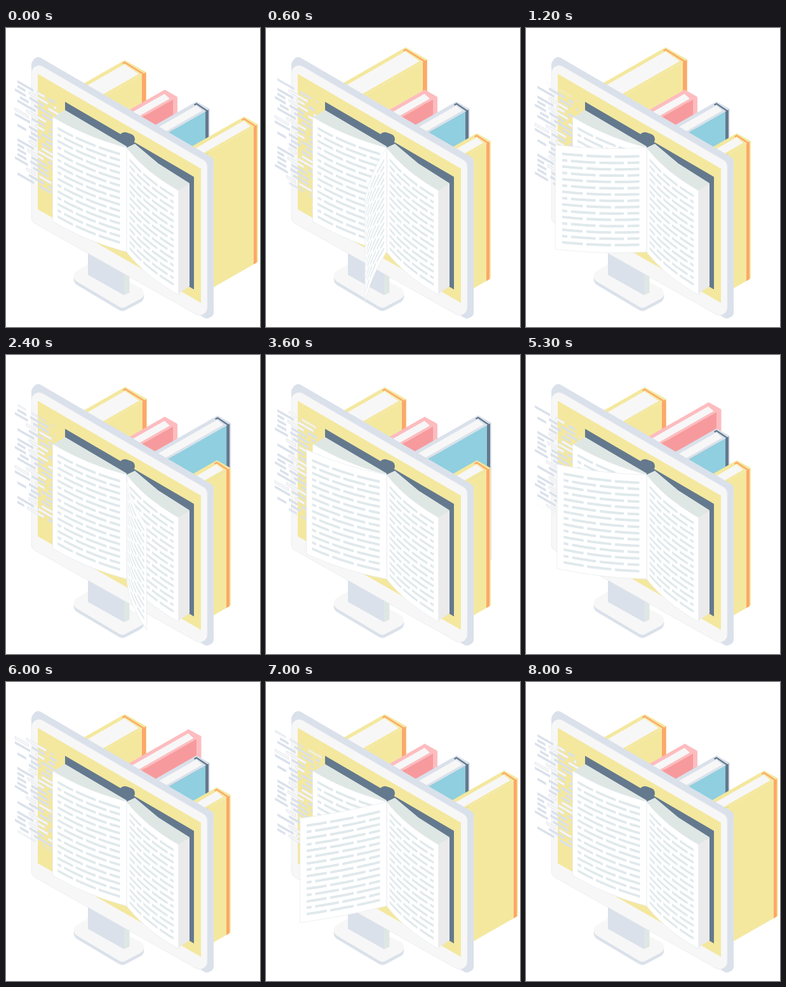
These frames come from a looping animation (400x470 px, 8100 ms). An HTML page with a canvas:

```html
<!DOCTYPE html>
<html lang="en">
<head>
<meta charset="utf-8">
<title>Online library</title>
<style>
html, body { margin: 0; width: 100%; height: 100%; overflow: hidden; background: #fff; }
canvas { display: block; width: 400px; height: 470px; }
</style>
</head>
<body>
<canvas id="stage"></canvas>
<script>
const LOOP = 8100, CYCLE = 8000, TURN = 2000, STEP = 100, SLIDE = 500;
const SLOPE = 0.57;
const C = {
  white: '#ffffff', paper: '#f7f7f7', edge: '#dae1eb', yellow: '#f4e89f', orange: '#fda769',
  pink: '#f79a9d', rose: '#fdbcbf', blue: '#8fcfdf', slate: '#64798d', text: '#e0e9ec',
  stack: '#dfe7e5', side: '#ebebeb', rim: '#e6e9ed'
};

const canvas = document.getElementById('stage');
const ctx = canvas.getContext('2d');
const scale = window.devicePixelRatio || 1;
canvas.width = 400 * scale;
canvas.height = 470 * scale;

// Cubic bezier easing with y1 = 0 and y2 = 1
function ease(x, x1, x2) {
  if (x <= 0) return 0;
  if (x >= 1) return 1;
  let lo = 0, hi = 1, s = 0.5;
  for (let i = 0; i < 30; i++) {
    s = (lo + hi) / 2;
    const bx = 3 * s * (1 - s) * (1 - s) * x1 + 3 * s * s * (1 - s) * x2 + s * s * s;
    if (bx < x) lo = s; else hi = s;
  }
  return s * s * (3 - 2 * s);
}

function seeded(seed) {
  return () => (seed = (seed * 16807) % 2147483647) / 2147483647;
}

function poly(points, fill, stroke) {
  ctx.beginPath();
  points.forEach(([x, y]) => ctx.lineTo(x, y));
  ctx.closePath();
  ctx.fillStyle = fill;
  ctx.fill();
  if (stroke) outline(stroke);
}

function outline(color, width = 0.7) {
  ctx.strokeStyle = color;
  ctx.lineWidth = width;
  ctx.stroke();
}

// Polygon with rounded corners
function rounded(points, radius, fill, stroke) {
  const n = points.length, [a, b] = [points[n - 1], points[0]];
  ctx.beginPath();
  ctx.moveTo((a[0] + b[0]) / 2, (a[1] + b[1]) / 2);
  points.forEach((p, i) => ctx.arcTo(...p, ...points[(i + 1) % n], radius));
  ctx.closePath();
  ctx.fillStyle = fill;
  ctx.fill();
  if (stroke) outline(stroke);
}

const shifted = (points, dx, dy) => points.map(([x, y]) => [x + dx, y + dy]);

// Books behind the screen, back to front; each slides out on its own turn
const books = [
  { x: 187, y: 50.5, w: 34, out: 33, turn: 0, lip: 0.5, face: C.yellow, rim: C.yellow, spine: C.orange },
  { x: 250, y: 97, w: 20, out: 37.5, turn: 2, lip: 2, face: C.pink, rim: C.rose, spine: C.rose },
  { x: 300, y: 115.5, w: 21, out: 34, turn: 1, lip: 2, face: C.blue, rim: C.edge, spine: C.slate },
  { x: 332, y: 165.5, w: 22, out: 43, turn: 3, lip: 2, face: C.yellow, rim: C.yellow, spine: C.orange }
];
const TALL = 216;

function slideAmount(turn, t) {
  const now = Math.floor(t / TURN) % 4;
  const k = ease((t % TURN) / SLIDE, 0.33, 0.2);
  if (turn === now) return k;
  return turn === (now + 3) % 4 ? 1 - k : 0;
}

function drawBook(b, t) {
  const move = b.out * slideAmount(b.turn, t);
  const back = ([x, y], len = 115) => [x - len, y + len * SLOPE];
  const drop = ([x, y]) => [x, y + TALL];
  const A = [0, 0], R = [b.w, b.w * 0.56], F = [b.w - 7, b.w * 0.56 + 4];
  const S = [R[0] - b.lip, R[1] + b.lip / 2];
  ctx.save();
  ctx.translate(b.x + move, b.y - move * 0.61);
  poly([A, R, F, back(F), back(A)], b.rim);
  poly([F, back(F), back(drop(F), 64), drop(F)], b.face);
  poly([F, R, drop(R), drop(F)], b.rim);
  poly([F, S, drop(S), drop(F)], b.spine);
  ctx.beginPath();
  ctx.moveTo(-3.5, 5.5);
  ctx.lineTo(0, 3.6);
  ctx.lineTo(F[0] + 3, F[1] - 0.8);
  outline(b.spine, 2.4);
  const P = [-0.5, 6.5], Q = [F[0] - 5, F[1] - 1.2];
  poly([P, Q, back(Q), back(P)], C.paper);
  ctx.restore();
}

function drawStand() {
  const base = [[97, 390], [134, 369], [229, 417], [183, 441]];
  rounded(shifted(base, 0, 5), 10, C.edge, C.rim);
  rounded(base, 10, C.paper);
  poly([[129, 345], [186, 375], [186, 420], [129, 388]], C.edge);
  poly([[186, 375], [194.5, 380], [194.5, 416], [186, 420]], C.stack);
}

function drawScreen() {
  rounded([[40, 55], [48, 43], [327, 205], [327, 452], [316, 458], [40, 290]], 8, C.edge);
  rounded([[40, 50], [317, 211], [317, 460], [40, 304]], 12, C.paper, C.rim);
  poly([[50, 72], [307, 221], [307, 432], [50, 285]], C.yellow);
}

// Tracks of dashes drift down and wrap around once per cycle
const TRACKS = 21, SPAN = 160, TOP = 66;
const rand = seeded(29);
const tracks = Array.from({ length: TRACKS }, (_, i) => {
  const dashes = [], end = 70 + rand() * 20;
  let x = [14, 18, 22, 32, 36][Math.floor(rand() * 5)];
  while (x < end) {
    const len = Math.min(10 + rand() * 22, end - x);
    dashes.push({ x, len, pale: rand() < 0.35 });
    x += len + 5 + rand() * 4;
  }
  return { c: i * SPAN / TRACKS, dashes };
});

function drawDashes(t) {
  for (const { c, dashes } of tracks) {
    const pos = (c + t * SPAN / CYCLE) % SPAN;
    ctx.globalAlpha = Math.min(1, pos / 5, (SPAN - pos) / 5);
    for (const { x, len, pale } of dashes) {
      const y = TOP + pos + x * SLOPE, end = y + len * SLOPE;
      poly([[x, y - 2], [x + len, end - 2], [x + len, end + 2], [x, y + 2]],
        pale ? C.paper : C.edge, pale && C.edge);
    }
  }
  ctx.globalAlpha = 1;
}

// Pages turn about the spine on a flattened circle
const SPINE = [190, 188], HEIGHT = 164, RX = 144, RY = 82;
const FROM = 55.4, TO = 216, ROWS = 15;
const INNER = 0.08, OUTER = 0.925, WORD = 0.27, PITCH = 0.31;

function spot(deg, r) {
  const a = deg * Math.PI / 180;
  return [RX * r * Math.cos(a), RY * r * Math.sin(a)];
}

function drawPage(p) {
  const deg = FROM + (TO - FROM) * p;
  const bend = spot(deg + 11 * Math.cos(Math.PI * p), 0.5), tip = spot(deg, 1);
  const at = u => [0, 1].map(i => SPINE[i] + 2 * u * (1 - u) * bend[i] + u * u * tip[i]);
  const band = (u0, u1, y0, y1) => {
    const n = Math.max(3, Math.ceil((u1 - u0) * 20)), upper = [], lower = [];
    for (let i = 0; i <= n; i++) {
      const [x, y] = at(u0 + (u1 - u0) * i / n);
      upper.push([x, y + y0]);
      lower.unshift([x, y + y1]);
    }
    return upper.concat(lower);
  };
  poly(band(0, 1, 0, HEIGHT), C.white, C.rim);
  for (let r = 0; r < ROWS; r++) {
    const y = 11 + r * 139 / (ROWS - 1);
    for (let u = INNER - (r % 2) * 0.14; u < OUTER - 0.01; u += PITCH) {
      poly(band(Math.max(u, INNER), Math.min(u + WORD, OUTER), y, y + 4), C.text);
    }
  }
}

function drawOpenBook(t) {
  poly([[93, 116], [296, 234], [296, 411], [271, 396], [93, 200]], C.slate);
  rounded([[178, 180], [178, 160], [203, 169], [203, 186]], 9, C.slate);
  poly([[74, 141], [93, 129], [190, 186], [190, 200], [74, 160]], C.stack);
  poly([[190, 188], [203, 182], [240, 213], [289, 244], [271, 258], [200, 240]], C.stack);
  poly([[271, 256], [289, 244], [289, 406], [271, 418]], C.side);
  drawPage(0);
  drawPage(1);
  const p = ease((t % TURN) / TURN, 0.33, 0.42);
  if (p > 0) drawPage(p);
}

function draw(t) {
  ctx.setTransform(scale, 0, 0, scale, 0, 0);
  ctx.fillStyle = C.white;
  ctx.fillRect(0, 0, 400, 470);
  books.forEach(b => drawBook(b, t));
  drawStand();
  drawScreen();
  drawDashes(t);
  drawOpenBook(t);
}

const start = performance.now();
let last = -1;
function tick() {
  const elapsed = (performance.now() - start) % LOOP;
  const t = Math.floor(elapsed / STEP) * STEP % CYCLE;
  if (t !== last) draw(last = t);
  requestAnimationFrame(tick);
}
tick();
</script>
</body>
</html>
```
